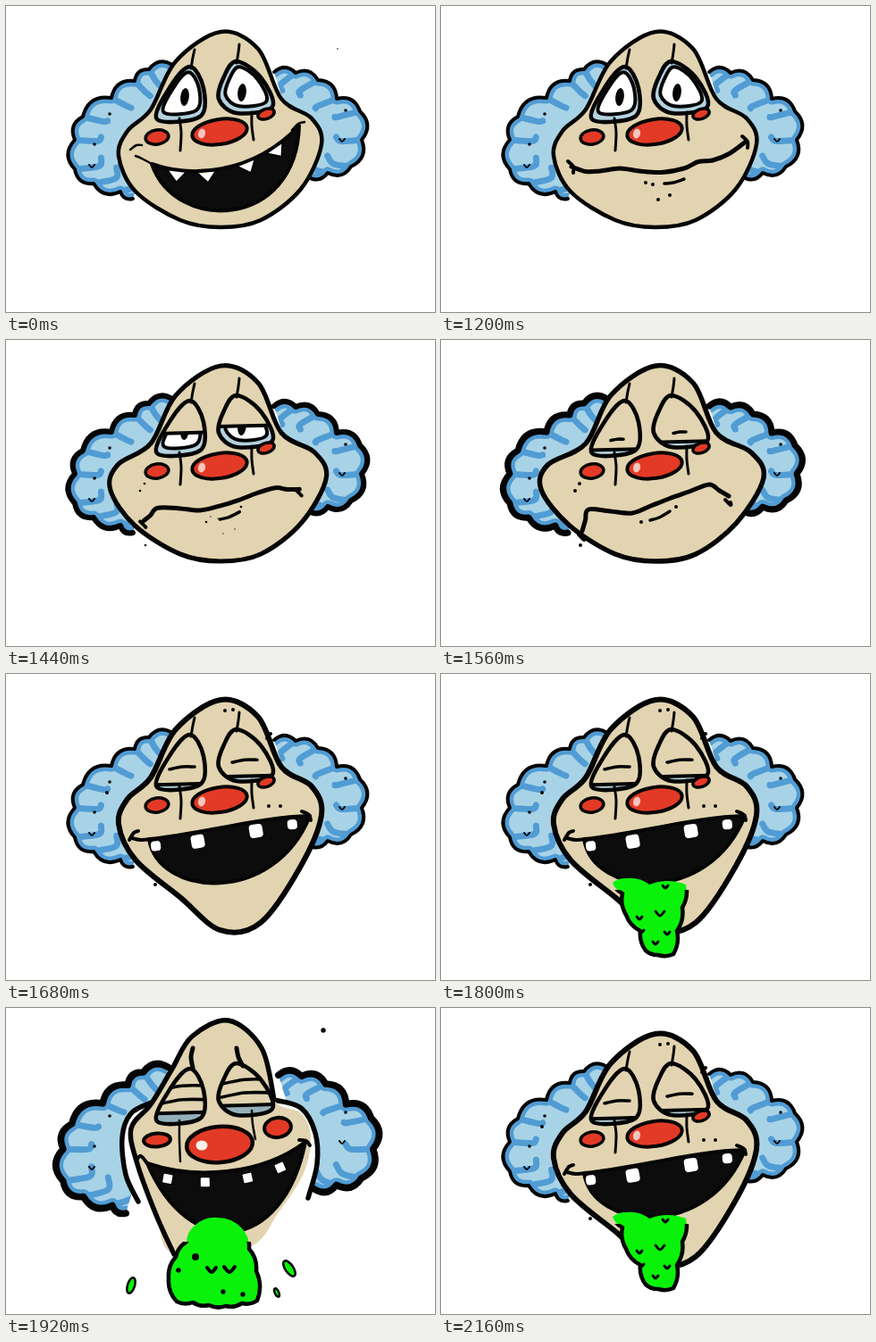
Recreate the animation shown at these times as an HTML page with a canvas. Size 480 by 343 pixels, loop 2280 ms.

```html
<!DOCTYPE html>
<html lang="en">
<head>
<meta charset="utf-8">
<title>Queasy clown</title>
<style>
html, body { margin: 0; width: 100%; height: 100%; overflow: hidden; background: #fff; }
canvas { display: block; width: 480px; height: 343px; }
</style>
</head>
<body>
<canvas id="stage" width="480" height="343"></canvas>
<script>
const g = document.getElementById('stage').getContext('2d');
const INK = '#050505', SKIN = '#e2d4b0', RED = '#e23a26', GREEN = '#0af20a';
const PALE = '#a8d3e6', BLUE = '#519cd4', LOOP = 2280;

const lerp = (a, b, t) => a + (b - a) * t;
const bell = (v, mid, spread) => Math.exp(-(((v - mid) / spread) ** 2));
const points = s => s.match(/\S+ \S+/g).map(p => p.split(' ').map(Number));
const blend = (a, b, t) => a.map((p, i) => p.map((v, j) => lerp(v, b[i][j], t)));
const scaled = (pts, cx, cy, sx, sy = sx) =>
  pts.map(([x, y]) => [cx + (x - cx) * sx, cy + (y - cy) * sy]);

// Smooth curve through the points.
function curve(pts, closed) {
  const n = pts.length, p = new Path2D();
  const at = i => pts[closed ? (i + n) % n : Math.max(0, Math.min(n - 1, i))];
  p.moveTo(...at(0));
  for (let i = 0; i < n - !closed; i++) {
    const [w, x, y, z] = [at(i - 1), at(i), at(i + 1), at(i + 2)];
    p.bezierCurveTo(x[0] + (y[0] - w[0]) / 6, x[1] + (y[1] - w[1]) / 6,
      y[0] - (z[0] - x[0]) / 6, y[1] - (z[1] - x[1]) / 6, y[0], y[1]);
  }
  if (closed) p.closePath();
  return p;
}
// Round bumps between clockwise points.
function scallops(pts, bulge) {
  const p = new Path2D();
  p.moveTo(...pts[0]);
  pts.slice(1).forEach(([x, y], i) => {
    const [u, v] = pts[i];
    p.quadraticCurveTo((u + x) / 2 + (y - v) * bulge, (v + y) / 2 - (x - u) * bulge, x, y);
  });
  return p;
}
function paint(p, fill, width, color = INK) {
  if (fill) { g.fillStyle = fill; g.fill(p); }
  if (width) { g.strokeStyle = color; g.lineWidth = width; g.stroke(p); }
}
function within(p, draw) {
  g.save();
  g.clip(p);
  draw();
  g.restore();
}
const line = (s, width) => paint(curve(points(s)), null, width);
function oval(x, y, rx, ry, turn, fill, width) {
  const p = new Path2D();
  p.ellipse(x, y, rx, ry, turn, 0, 7);
  paint(p, fill, width);
}
const dots = (s, r = 2) => points(s).forEach(([x, y]) => oval(x, y, r, r, 0, INK));
const smirk = (x, y, r, width = 3) => line(`${x - r} ${y} ${x} ${y + r} ${x + r} ${y}`, width);

const locks = [
  points('142 216 128 208 98 199 77 183 77 150 86 124 118 103 144 84 160 71 186 66'),
  points('300 74 324 75 349 83 370 104 396 118 398 150 386 180 360 187 337 191')
];
function hair(width, sx = 1, sy = 1) {
  for (const lock of locks) {
    const pts = scaled(lock, 240, 60, sx, sy), edge = scallops(pts, .46);
    paint(edge, PALE);
    within(edge, () => {
      paint(edge, null, width + 9, BLUE);
      for (const [x, y] of pts.slice(1, -1)) {
        const dx = (240 - x) * .15, dy = (140 - y) * .15;
        paint(curve([[x, y], [x + dx - dy * .4, y + dy + 3], [x + dx * 1.2, y + dy * 2]]), null, 7, BLUE);
      }
    });
    paint(edge, null, width);
  }
  dots('99 155 116 121 380 117', 1.8);
  smirk(96, 178, 3, 2);
  smirk(376, 149, 3, 2);
}

const skull = points('162 116 190 62 240 29 282 48 308 104 342 126 353 155 330 205 285 240 240 248 195 240 145 208 126 168 136 140');
// puff blows the cheeks out sideways, drop pulls the chin down.
function head(puff, drop, width) {
  const pts = skull.map(([x, y]) => [
    x + (y > 120) * puff * bell(y, 150, 35) * (x < 240 ? -18 : 8),
    y + (y > 150) * drop * bell(x, 262, 55)
  ]);
  paint(curve(pts, true), SKIN, width);
}

const sockets = [
  { pts: points('206 68 221 92 217 124 169 127 184 90'), x: 197, top: 68, tall: 60, pupil: [200, 102] },
  { pts: points('258 62 285 80 298 113 258 120 238 104 244 79'), x: 267, top: 62, tall: 57, pupil: [264, 97] }
];
// shut: 0 is wide open, 1 is fully lidded; folds are creases at heights on the lid.
function eyes(shut, folds = [], reach = 15, tint = '#b4d2df') {
  for (const { pts, x, top, tall, pupil } of sockets) {
    const rim = curve(pts, true), at = f => top + tall * f;
    paint(rim, tint);
    if (shut < .8) {
      paint(curve(scaled(pts, x + 3, top + 26, .76), true), '#fff', 4);
      oval(...pupil, 4.8, 10, .12, INK);
    }
    if (shut) within(rim, () => {
      g.fillStyle = SKIN;
      g.fillRect(x - 40, top - 5, 80, tall * shut + 5);
      line(`${x - 40} ${at(shut)} ${x + 40} ${at(shut) - 2}`, 4);
      for (const f of folds)
        line(`${x - reach} ${at(f) + reach * .2} ${x} ${at(f)} ${x + reach} ${at(f)}`, 3.6);
    });
    paint(rim, null, 4.6);
  }
}
function nose() {
  line('211 49 209 58 207 70', 3);
  line('261 43 260 52 258 64', 3);
  line('194 126 196 142 195 162', 3);
  line('275 119 275 134 277 150', 3);
  oval(239, 141, 31, 14, -.15, RED, 4);
  oval(219, 143, 4, 5.5, .25, '#f7c5bd');
  oval(169, 147, 13, 8, -.15, RED, 3.5);
  oval(291, 121, 9.5, 5.5, -.35, RED, 3.5);
}

function along([a, b, c, d], t) {
  const s = 1 - t;
  return [0, 1].map(i => s * s * s * a[i] + 3 * s * s * t * b[i] + 3 * s * t * t * c[i] + t * t * t * d[i]);
}
// Open mouth: the lip is a cubic from left to right, the jaw two controls back.
function maw(lip, jaw, teeth, tooth) {
  const [a, b, c, d] = points(lip), [e, f] = points(jaw), p = new Path2D();
  p.moveTo(...a);
  p.bezierCurveTo(...b, ...c, ...d);
  p.bezierCurveTo(...e, ...f, ...a);
  paint(p, '#0c0c0c', 4);
  for (const t of teeth) {
    const [x, y] = along([a, b, c, d], t), [u, v] = along([a, b, c, d], t + .02);
    g.save();
    g.translate(x, y);
    g.rotate(Math.atan2(v - y, u - x));
    tooth(t);
    g.restore();
  }
}
function fang() {
  paint(new Path2D('M-11 1L11 1L1 14Z'), '#fff', 2);
}
function stump(wide, drop, round) {
  const p = new Path2D();
  p.roundRect(-wide / 2, drop, wide, wide, round);
  paint(p, '#fff');
}

function grin() {
  hair(4);
  head(0, 0, 4.5);
  eyes(0);
  nose();
  maw('163 177 205 192 275 190 328 134', '325 250 190 255', [.2, .4, .65, .83], fang);
  line('139 161 146 156 152 156', 2.5);
  line('145 168 152 171 163 177', 2.5);
  line('320 139 327 132 334 130', 2.5);
  dots('371 48', .8);
}

const smile = points('146 180 178 185 222 185 272 182 304 173 341 152');
const frown = points('158 214 165 190 214 194 255 178 300 162 322 175');
function queasy(t) {
  hair(lerp(4, 7, t));
  head(t, 0, lerp(4.5, 5.5, t));
  eyes(t * .93, t === 1 ? [.72] : [], 7);
  nose();
  const mouth = blend(smile, frown, t), ends = [mouth[0], mouth[5]];
  const wavy = [];
  mouth.slice(1).forEach((p, i) => {
    wavy.push(mouth[i], [lerp(mouth[i][0], p[0], .5), lerp(mouth[i][1], p[1], .5) + (i % 2 ? -3 : 3) * (1 - t)]);
  });
  paint(curve([...wavy, mouth[5]]), null, 5);
  for (const [x, y] of ends) line(`${x - 4} ${y - 6 + 10 * t} ${x + 2} ${y + 10 * t} ${x + 2} ${y + 7}`, 4);
  paint(curve(blend(points('250 199 260 198 272 194'), points('234 202 244 199 256 192'), t)), null, 3.5);
  dots('229 198 237 200 243 217 256 212', 2 * (1 - t));
  dots('224 204 263 187 155 161 150 169 156 230', 2 * t);
}

// Slime is outlined only where it has left the mouth.
function slime(s, bulge, lipY) {
  const p = scallops(points(s), bulge);
  paint(p, GREEN);
  const outside = new Path2D();
  outside.rect(0, lipY, 480, 343);
  within(outside, () => paint(p, null, 4.5));
}

function gape(spill) {
  hair(4);
  head(0, 46, 6);
  eyes(.94, [.6], 14);
  nose();
  maw('160 185 215 180 285 160 340 159', '300 260 170 250', [.04, .3, .65, .88],
    t => stump(t > .1 && t < .8 ? 15 : 11, 3, 4));
  line('138 186 143 178 148 176', 4);
  line('141 184 151 186 163 185', 4);
  line('331 154 339 158 341 164', 4);
  dots('245 41 254 40 292 72 296 67 294 148 307 148 167 236 172 233 113 133');
  if (!spill) return;
  slime('203 246 192 234 208 229 233 236 274 236 270 262 264 288 260 314 243 315 229 310 223 288 207 270 203 246', .2, 242);
  smirk(245, 266, 5);
  for (const [x, y] of points('251 237 222 272 240 300 253 289 224 287')) smirk(x, y, 3);
}

function eruption() {
  hair(7.5, 1.08, 1.09);
  for (const s of ['148 217 134 187 130 145 140 118 165 105', '300 103 330 112 346 140 348 175 338 213'])
    paint(curve(points(s)), '#fff', 5.5);
  const edge = '188 276 168 232 147 175 140 135 162 108 186 68 208 32 249 14 286 45 300 103';
  paint(curve(points(edge + ' 330 118 341 145 333 185 305 229 272 268'), true), SKIN);
  line(edge, 5.5);
  eyes(.84, [.32, .58], 32, '#93b0ba');
  line('209 45 207 55 209 67', 5);
  line('258 45 260 55 265 65', 5);
  line('194 126 194 148 195 172', 2.5);
  line('275 115 276 130 279 147', 2.5);
  oval(239, 153, 37, 20, -.08, RED, 4.5);
  oval(219, 154, 6.5, 5.5, 0, '#fff1e9');
  oval(169, 148, 15, 7.5, -.08, RED, 4);
  oval(304, 134, 15, 11, -.15, RED, 4);
  maw('158 174 210 192 285 188 335 150', '310 275 205 285', [.15, .37, .61, .8], () => stump(10, 6, 1));
  line('147 169 151 166 158 174', 4);
  line('328 148 336 149 340 154', 4);
  slime('202 262 211 244 237 235 264 247 272 270 280 295 281 328 264 331 246 334 227 333 209 330 191 329 182 303 190 279 202 262', .22, 262);
  dots('212 279', 4);
  dots('193 294 243 318 265 321 355 25', 2.7);
  smirk(230, 291, 5, 4);
  smirk(250, 290, 6, 4);
  for (const [x, y, turn, size] of [[140, 311, .3, 9], [317, 292, -.6, 10], [303, 319, -.4, 5]])
    oval(x, y, size * .45, size, turn, GREEN, 2.5);
}

const poses = [
  [2160, () => gape(true)], [1920, eruption], [1800, () => gape(true)], [1680, () => gape(false)],
  [1560, () => queasy(1)], [1440, () => queasy(2 / 3)], [1320, () => queasy(1 / 3)], [1200, () => queasy(0)], [0, grin]
];
const start = performance.now();
function draw() {
  const t = Math.max(0, performance.now() - start) % LOOP;
  g.fillStyle = '#fff';
  g.fillRect(0, 0, 480, 343);
  g.lineCap = g.lineJoin = 'round';
  poses.find(([from]) => t >= from)[1]();
  requestAnimationFrame(draw);
}
draw();
</script>
</body>
</html>
```
